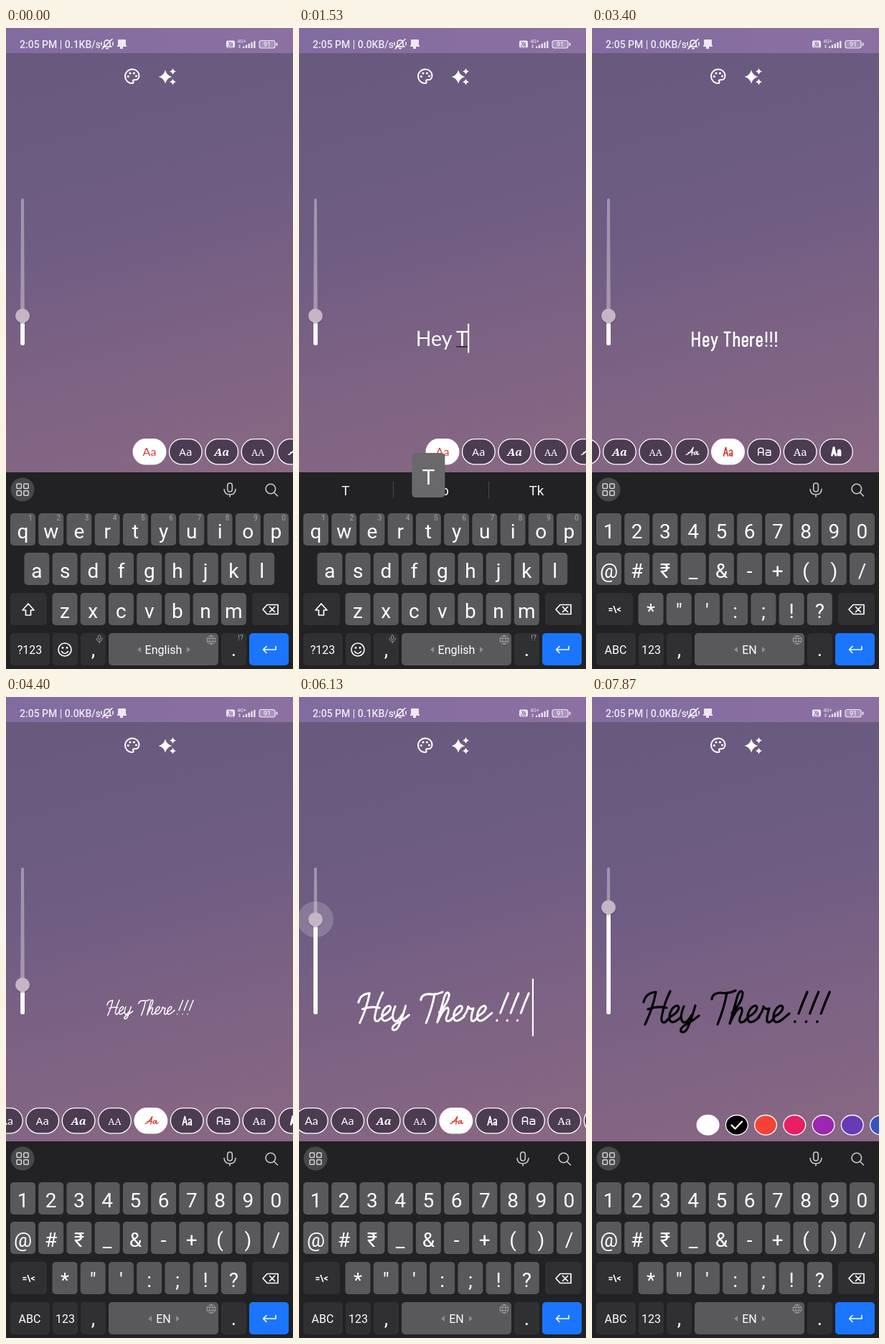
Write an HTML page that moves like this. It is 400x893 px and loops after 8 s.

```html
<!DOCTYPE html>
<html lang="en">
<head>
<meta charset="utf-8">
<title>Text styles</title>
<style>
html, body { margin: 0; width: 100%; height: 100%; overflow: hidden; background: #222123; }
svg { display: block; width: 400px; height: 893px; font-family: Roboto, sans-serif; }
text { white-space: pre; }
.mid { text-anchor: middle; }
.line { fill: none; stroke: #fff; stroke-linecap: round; stroke-linejoin: round; }
</style>
</head>
<body>
<svg id="stage" viewBox="0 0 400 893" xmlns="http://www.w3.org/2000/svg"></svg>
<script>
const LOOP = 8000;
const $ = id => document.getElementById(id);
const show = (id, on) => { $(id).style.display = on ? '' : 'none'; };
const rect = (x, y, w, h, r, fill, more = '') =>
  `<rect x="${x}" y="${y}" width="${w}" height="${h}" rx="${r}" fill="${fill}" ${more}/>`;
const label = (x, y, size, s, fill = '#fff', more = '') =>
  `<text class="mid" x="${x}" y="${y}" font-size="${size}" fill="${fill}" ${more}>${s}</text>`;
const line = (d, w = 1.6, more = '') => `<path class="line" d="${d}" stroke-width="${w}" ${more}/>`;
const fill = (d, c = '#fff') => `<path d="${d}" fill="${c}"/>`;
const dot = (x, y, r, c = '#fff') => `<circle cx="${x}" cy="${y}" r="${r}" fill="${c}"/>`;
const esc = s => s.replace(/&/g, '&amp;').replace(/</g, '&lt;');

// time, text, keyboard, pressed key, suggestions
const TYPING = [
  [0, '', 'abc'],
  [70, '', 'caps'],
  [200, 'H', 'abc', 'h', 'H,Hi,Hey'],
  [600, 'He', 'abc', 'e', 'He,Hey,Her'],
  [800, 'Hey', 'abc', 'y', 'Hey,Hey!,Heyy'],
  [1000, 'Hey ', 'abc', '', 'I,there,what'],
  [1270, 'Hey ', 'caps', '', 'I,There,What'],
  [1470, 'Hey T', 'abc', 't', 'T,Tb,Tk'],
  [1670, 'Hey Th', 'abc', 'h', 'Th,The,This'],
  [1800, 'Hey The', 'abc', 'e', 'The,There,Then'],
  [1930, 'Hey Ther', 'abc', 'r', 'Ther,There,Therapy'],
  [2070, 'Hey There', 'abc', 'e', 'There,Theres,Thereby'],
  [2230, 'Hey There', 'sym'],
  [2400, 'Hey There!', 'sym', '!'],
  [2470, 'Hey There!!', 'sym', '!'],
  [2540, 'Hey There!!!', 'sym', '!']
];
const SCROLL = [[2870, 0], [3400, -262], [3670, -345], [3800, -345], [4400, -199.6], [4800, -182.6]];
const SIZE = [[5000, 401], [5400, 368], [5600, 368], [6130, 310], [6400, 294], [6470, 293]];
const SWATCH = [[7230, 0], [7730, -40.25]];
const CARET_OFF = [[0, 200], [3170, 3670], [4170, 4670], [5170, 5670], [6170, 6600], [6870, 7370], [7870, 8000]];
const COLORS = ['#ffffff', '#000000', '#f44336', '#e91e63', '#9c27b0', '#673ab7', '#3455c0'];
const PITCH = 50.35, GAP = 40.25;

const FONTS = [
  { family: 'Lato, sans-serif', size: 28.5, pill: 16 },
  { family: '"Noto Sans", sans-serif', size: 26, pill: 15 },
  { family: '"Noto Serif", serif', size: 26, pill: 15, more: 'font-weight="800" font-style="italic"' },
  { family: '"Noto Serif", serif', size: 23, pill: 13, upper: true, more: 'font-weight="500"' },
  { art: 'script', half: 63.5, icon: 'M-8 4Q-4 4 2-6Q0 0 0 5M-5 1Q-1 0 2 1M8 0Q4-1 3 3Q4 6 8 0Q6 6 10 3', w: 1.3 },
  { art: 'narrow', half: 61, icon: 'M-6 6L-3-6 0 6M-5 2H-1M2.3-1Q5.5-4 6 0V6M6 2Q2 2 2 4.5Q3 7 6 4', w: 1.7 },
  { family: '"DejaVu Sans", sans-serif', size: 25, icon: 'M-8 5V-2Q-8-5-5-5H-4Q-1-5-1-2V5M-8 1H-1M3-2H7Q9-2 9 0V5H4Q2.5 5 2.5 3T4 1H9', w: 1.4 },
  { family: '"Noto Serif", serif', size: 26, pill: 15, more: 'font-weight="500"' },
  { art: 'narrow', half: 61, icon: 'M-6 5L-3.5-6 -1 5M-5 2H-2M2.5-1Q5-4 5.5 0V5M5.5 1Q2 1 2 4Q3 6 5.5 3', w: 2.8, heavy: true }
];

function script() {
  const e = 'm0 0q12-6 13-13q-1-6-8 0q-6 7-5 16q3 9 16-3';
  const bang = [0, 15.7, 31.2].map(x =>
    `M${300 + x} 411Q${293 + x} 427 ${288 + x} 441M${283 + x} 452l-.4.6`).join('');
  return line('M72 425Q75 412 89 411Q85 433 74 456M109 410Q100 428 97 446Q96 455 102 453L109 446'
    + 'M78 435Q90 430 104 433M108 446' + e
    + 'M128 431Q121 448 127 453Q132 455 139 443M144 430Q139 447 135 457Q130 470 124 466Q122 461 133 455Q142 450 149 444'
    + 'M167 421Q168 412 180 412Q190 414 200 409M188 412Q184 434 175 456'
    + 'M195 440Q210 424 210 412Q207 406 203 416L192 455Q202 432 208 433Q211 436 206 447Q204 456 212 452L218 446'
    + 'M217 446' + e + 'M232 446Q238 438 239 431Q241 436 247 434Q243 446 244 452Q248 456 254 446'
    + 'M253 446' + e + 'L275 441' + bang, 3.2);
}

function narrow() {
  const glyph = {
    H: 'M0-21V0M9-21V0M0-11H9',
    e: 'M0-7.5H6.6V-10.5Q6.6-14 3.4-14T0-10.5V-4Q0-1 3.4-1T6.6-5',
    y: 'M0-14.7L4-1.5M8-14.7L4-1 3 1.5Q2 5.5-.5 5',
    T: 'M0-20H10M5-20V0',
    h: 'M0-21V0M0-11Q2-13.8 4.2-13.8T6.8-10.8V0',
    r: 'M0-14.7V0M0-10Q1.5-13.8 5-13.8',
    '!': 'M0-21V-6M0-2.6V0'
  };
  const xs = [140.3, 155.5, 166.5, 183.5, 198, 210, 221.5, 230, 243, 249.7, 256.5];
  return [...'HeyThere!!!'].map((c, i) =>
    line(glyph[c], 2.5, `transform="translate(${xs[i]} 444)" style="stroke-linecap:butt;stroke-width:inherit"`)).join('');
}

const KEY = '#59585b', DARK = '#302f32', GREY = '#a2a1a4';
const keyAt = {};
function row(chars, x, y, hints) {
  return chars.map((c, i) => {
    const kx = x + i * 39.22;
    keyAt[c] = [kx, y];
    return rect(kx, y, 35, 45, 5, KEY) + label(kx + 17.5, y + 35, 28, esc(c))
      + (hints ? label(kx + 28, y + 10, 10, (i + 1) % 10, GREY) : '');
  }).join('');
}
const globe = `<g transform="translate(286 852.5)">` + line('M-6 0A6 6 0 1 1 6 0A6 6 0 1 1-6 0M-6-2H6M-6 2H6M0-6Q-5 0 0 6Q5 0 0-6', .9, `style="stroke:${GREY}"`) + '</g>';
const backspace = rect(343, 787, 51, 45, 5, DARK)
  + line('M358 810L364 803.5H379V816.5H364ZM367.5 806.5L374.5 813.5M374.5 806.5L367.5 813.5', 1.7);

function bottom(word, half) {
  return rect(6, 843, 55, 45, 5, DARK) + rect(65, 843, 35, 45, 5, DARK)
    + rect(104, 843, 35, 45, 5, DARK) + rect(143, 843, 153, 45, 5, KEY)
    + rect(300, 843, 35, 45, 5, DARK) + rect(339, 843, 55, 45, 5, '#1b75ff')
    + label(121.5, 875, 28, ',') + label(317.5, 875, 28, '.') + label(219.5, 872, 16, word)
    + fill(`M${220 - half - 3} 866l5-4v8zM${220 + half + 3} 866l-5-4v8z`, '#8d8c8f') + globe
    + line('M376 861.5V866H358.5M363 861.5L358.5 866L363 870.5', 1.6);
}
function letters(caps) {
  const set = s => [...(caps ? s.toUpperCase() : s)];
  return row(set('qwertyuiop'), 6, 676, true) + row(set('asdfghjkl'), 25.4, 731)
    + rect(6, 787, 51, 45, 5, DARK) + row(set('zxcvbnm'), 64.5, 787) + backspace
    + line('M31 802L23 811H27.5V818H34.5V811H39Z', 1.7, caps ? 'style="fill:#fff"' : '')
    + bottom('English', 34) + label(33, 872, 16, '?123')
    + line('M73 866a9 9 0 1 1 18 0a9 9 0 1 1-18 0M77.5 868.5Q82 874.5 86.5 868.5', 1.6)
    + dot(79, 863.5, 1.4) + dot(85, 863.5, 1.4) + label(327, 853, 10, '!?', GREY)
    + rect(128.5, 846, 3.4, 6, 1.7, 'none', `stroke="${GREY}"`)
    + line('M126 850Q126.5 854.5 130.2 854.5T134.4 850M130.2 854.5V857', 1, `style="stroke:${GREY}"`);
}
function symbols() {
  return row([...'1234567890'], 6, 676) + row([...'@#₹_&-+()/'], 6, 731)
    + rect(6, 787, 51, 45, 5, DARK) + label(31.5, 814, 12, '=\\&lt;', '#fff', 'font-weight="700"')
    + row([...'*"\':;!?'], 64.5, 787) + backspace + bottom('EN', 19)
    + label(33, 872, 16, 'ABC') + label(82.5, 872, 16, '123');
}

function statusBar() {
  const c = '#eee8f4';
  return `<text id="clock" x="19" y="28" font-size="14" font-weight="500" fill="${c}"></text>`
    + `<g style="--c:${c}">` + line('M135 26H147M137 26V21Q137 17 141 17T145 21V26M139.5 28.5H142.5M134 29L148 15.5M133 20v4M149 20v4', 1.4)
    + rect(156, 16, 11, 8, 1, c) + fill('M155 24h13v2h-5v3h-4v-3h-4z', c)
    + rect(307, 17.5, 12, 10, 2, c) + label(313, 22.5, 5, 'Vo', '#6f5b86', 'font-weight="700"')
    + label(313, 26.8, 4.5, 'LTE', '#6f5b86', 'font-weight="700"')
    + label(328.5, 21, 7, '4G+', c) + fill('M324 25l1.5-2 1.5 2zM324 26h3l-1.5 2z', c)
    + [0, 1, 2, 3, 4].map(i => rect(330 + i * 3.8, 25.5 - i * 1.9, 2.3, 2.5 + i * 1.9, .6, c)).join('')
    + rect(353, 17.5, 22, 10.5, 3, 'rgba(255,255,255,.25)', `stroke="${c}" stroke-width="1.2"`)
    + rect(376.6, 20.5, 1.8, 4.5, .8, c) + label(364, 26, 9, '91', c, 'font-weight="500"') + '</g>';
}
const star = (x, y, r) => fill(`M${x} ${y - r}Q${x + r * .2} ${y - r * .2} ${x + r} ${y}Q${x + r * .2} ${y + r * .2} ${x} ${y + r}Q${x - r * .2} ${y + r * .2} ${x - r} ${y}Q${x - r * .2} ${y - r * .2} ${x} ${y - r}`);
const tools = line('M176 77C170 77 166 72.5 166 67.2S170.5 57.5 176 57.5S185.5 61.5 185.5 66.5C185.5 70 183 72.3 180 72.3H178.2C176.6 72.3 176.8 73.8 177.4 74.6C178 75.6 177.4 77 176 77Z', 2)
  + dot(170.3, 67.5, 1.6) + dot(173, 63, 1.6) + dot(178.4, 63, 1.6) + dot(181.5, 67, 1.6)
  + star(222, 68, 9.5) + star(232.5, 60.5, 4.6) + star(232.5, 75, 4.6);

const soft = 'style="stroke:#c9c8cb"';
const toolbar = dot(23, 643, 16.5, '#48474a')
  + [[15, 635], [24.8, 635], [15, 644.8], [24.8, 644.8]].map(p => rect(p[0], p[1], 6.4, 6.4, 1.2, 'none', 'stroke="#d2d1d4" stroke-width="1.5"')).join('')
  + rect(308.7, 634, 6.6, 12, 3.3, 'none', 'stroke="#c9c8cb" stroke-width="1.6"')
  + line('M304 642.5Q304.5 650 312 650T320 642.5M312 650V653', 1.6, soft)
  + line('M362 642a6.8 6.8 0 1 1 13.6 0a6.8 6.8 0 1 1-13.6 0M374 647.5L378.5 652', 1.6, soft);

const pills = FONTS.map((f, i) => `<g transform="translate(${200 + i * PITCH} 590.3)">`
  + rect(-22.8, -17.6, 45.6, 35.2, 17.6, '#4c3c51', `class="pill" stroke="#fff" stroke-width="1.3"`)
  + (f.icon ? line(f.icon, f.w, 'data-icon="1"')
    : label(0, 5.5, f.pill, f.upper ? 'AA' : 'Aa', '#fff', `data-icon="1" ${f.more || ''} style='font-family:${f.family}'`))
  + '</g>').join('');
const swatches = COLORS.map((c, i) => `<ellipse cx="${201.8 + i * GAP}" cy="596.3" rx="15.4" ry="13.8" fill="${c}" stroke="#fff" stroke-width="1.3"/>`).join('');

$('stage').innerHTML = `
<defs>
  <linearGradient id="sky" gradientUnits="userSpaceOnUse" x1="140" y1="30" x2="300" y2="640">
    <stop offset="0" stop-color="#69597f"/><stop offset=".35" stop-color="#6e5c83"/>
    <stop offset=".7" stop-color="#7e6384"/><stop offset="1" stop-color="#896883"/>
  </linearGradient>
  <linearGradient id="top"><stop stop-color="#826c9f"/><stop offset="1" stop-color="#8c70a2"/></linearGradient>
</defs>
${rect(0, 0, 400, 620, 0, 'url(#sky)')}${rect(0, 0, 400, 35, 0, 'url(#top)')}
${statusBar()}${tools}
<path d="M21 239Q23 235.5 25 239L26 440H20Z" fill="#fff" opacity=".35"/>
<rect id="level" x="20.2" width="5.8" rx="2.5" fill="#fff"/>
<g id="thumb"><circle id="halo" r="25" fill="#fff" opacity=".18"/><circle cy="1.2" r="10.4" fill="#000" opacity=".18"/>${dot(0, 0, 10, '#c5b5c5')}</g>
<g id="words"><text id="typed" class="mid" y="443"></text><path id="under" stroke="#27222c" stroke-width="1.5"/></g>
<g id="script" role="img" aria-label="Hey There!!!">${script()}</g>
<g id="narrow" role="img" aria-label="Hey There!!!">${narrow()}</g>
<rect id="caret" width="2.2" fill="#fff"/>
<g id="pills">${pills}</g>
<g id="colors">${swatches}<path id="check" class="line" stroke-width="2.4"/></g>
${rect(0, 619, 400, 274, 0, '#222123')}
<g id="tools">${toolbar}</g>
<g id="hints">${[65, 198, 331].map(x => label(x, 651, 19, '', '#f4f4f4', 'data-hint="1"')).join('')}
${rect(131, 632, 1, 23, 0, '#4a494c')}${rect(264, 632, 1, 23, 0, '#4a494c')}</g>
<g id="abc">${letters(false)}</g><g id="caps">${letters(true)}</g><g id="sym">${symbols()}</g>
<g id="popup">${rect(-23, -84, 46, 62, 5, '#69686b')}${label(0, -40, 30, '', '#fff', 'id="big"')}</g>`;

const hintText = [...document.querySelectorAll('[data-hint]')];
const pillShape = [...document.querySelectorAll('.pill')];
const pillIcon = [...document.querySelectorAll('[data-icon]')];

function along(keys, t) {
  if (t <= keys[0][0]) return keys[0][1];
  for (let i = 1; i < keys.length; i++) {
    const [a, from] = keys[i - 1], [b, to] = keys[i];
    if (t < b) return from + (to - from) * (t - a) / (b - a);
  }
  return keys[keys.length - 1][1];
}

function drawKeyboard(t, step) {
  const [start, text, mode, key, hints] = step;
  for (const m of ['abc', 'caps', 'sym']) show(m, m === mode);
  show('tools', !hints);
  show('hints', hints);
  if (hints) hints.split(',').forEach((h, i) => { hintText[i].textContent = h; });
  const pressed = key && t - start < 125;
  show('popup', pressed);
  if (pressed) {
    const [x, y] = keyAt[key];
    $('popup').setAttribute('transform', `translate(${x + 17.5} ${y})`);
    $('big').textContent = text.slice(-1);
  }
}

function drawWords(t, text, font, scale, color) {
  const f = FONTS[font];
  let half = f.half;
  show('words', !f.art);
  show('script', f.art === 'script');
  show('narrow', f.art === 'narrow');
  if (f.art) {
    const g = $(f.art), k = f.art === 'script' ? scale / 2.157 : scale;
    g.setAttribute('transform', `translate(200.5 432.5) scale(${k}) translate(-200.5 -432.5)`);
    g.style.strokeWidth = f.heavy ? 4.6 : 2.5;
    g.querySelectorAll('path').forEach(p => { p.style.stroke = color; });
  } else {
    const el = $('typed');
    el.textContent = f.upper ? text.toUpperCase() : text;
    el.setAttribute('style', `font-family:${f.family};font-size:${f.size}px`
      + (f.more ? `;font-weight:${f.more.match(/\d+/)[0]}${f.more.includes('italic') ? ';font-style:italic' : ''}` : ''));
    el.setAttribute('x', 199.3);
    el.setAttribute('fill', color);
    const w = text ? el.getComputedTextLength() : 0;
    half = w / 2 - 1;
    const word = text.match(/[A-Za-z]+$/);
    show('under', word);
    if (word) {
      const from = 199.3 - w / 2 + (word.index ? el.getSubStringLength(0, word.index) : 0);
      $('under').setAttribute('d', `M${from} 444H${199.3 + w / 2}`);
    }
  }
  const caret = $('caret');
  show('caret', !CARET_OFF.some(([a, b]) => t >= a && t < b));
  caret.setAttribute('x', 199.4 + half * scale);
  caret.setAttribute('y', 432 - 20 * scale);
  caret.setAttribute('height', 40.5 * scale);
  caret.setAttribute('fill', color);
}

function draw(t) {
  const step = TYPING.filter(s => s[0] <= t).pop();
  const rate = t < 200 || (t >= 5300 && t < 7200) ? '0.1' : '0.0';
  $('clock').textContent = `2:05 PM | ${rate}KB/s`;
  drawKeyboard(t, step);

  const x = along(SCROLL, t), font = Math.min(8, Math.round(-x / PITCH));
  $('pills').setAttribute('transform', `translate(${x} 0)`);
  pillShape.forEach((p, i) => {
    const on = i === font, ink = on ? '#d83a33' : '#fff';
    p.setAttribute('fill', on ? '#fff' : '#4c3c51');
    pillIcon[i].style[FONTS[i].icon ? 'stroke' : 'fill'] = ink;
  });

  const palette = t >= 7000, cx = along(SWATCH, t), pick = Math.round(-cx / GAP);
  show('pills', !palette);
  show('colors', palette);
  $('colors').setAttribute('transform', `translate(${cx} 0)`);
  $('check').setAttribute('d', `M${194.5 + pick * GAP} 596.5l5 5 9.5-10`);
  $('check').style.stroke = pick ? '#fff' : '#222';

  const y = along(SIZE, t);
  $('thumb').setAttribute('transform', `translate(23 ${y})`);
  $('level').setAttribute('y', y);
  $('level').setAttribute('height', 442 - y);
  show('halo', t >= 5000 && t < 6400);
  drawWords(t, step[1], font, 1 + (401 - y) * .010713, COLORS[palette ? pick : 0]);
}

const start = performance.now();
function tick() {
  draw((performance.now() - start) % LOOP);
  requestAnimationFrame(tick);
}
tick();
</script>
</body>
</html>
```
